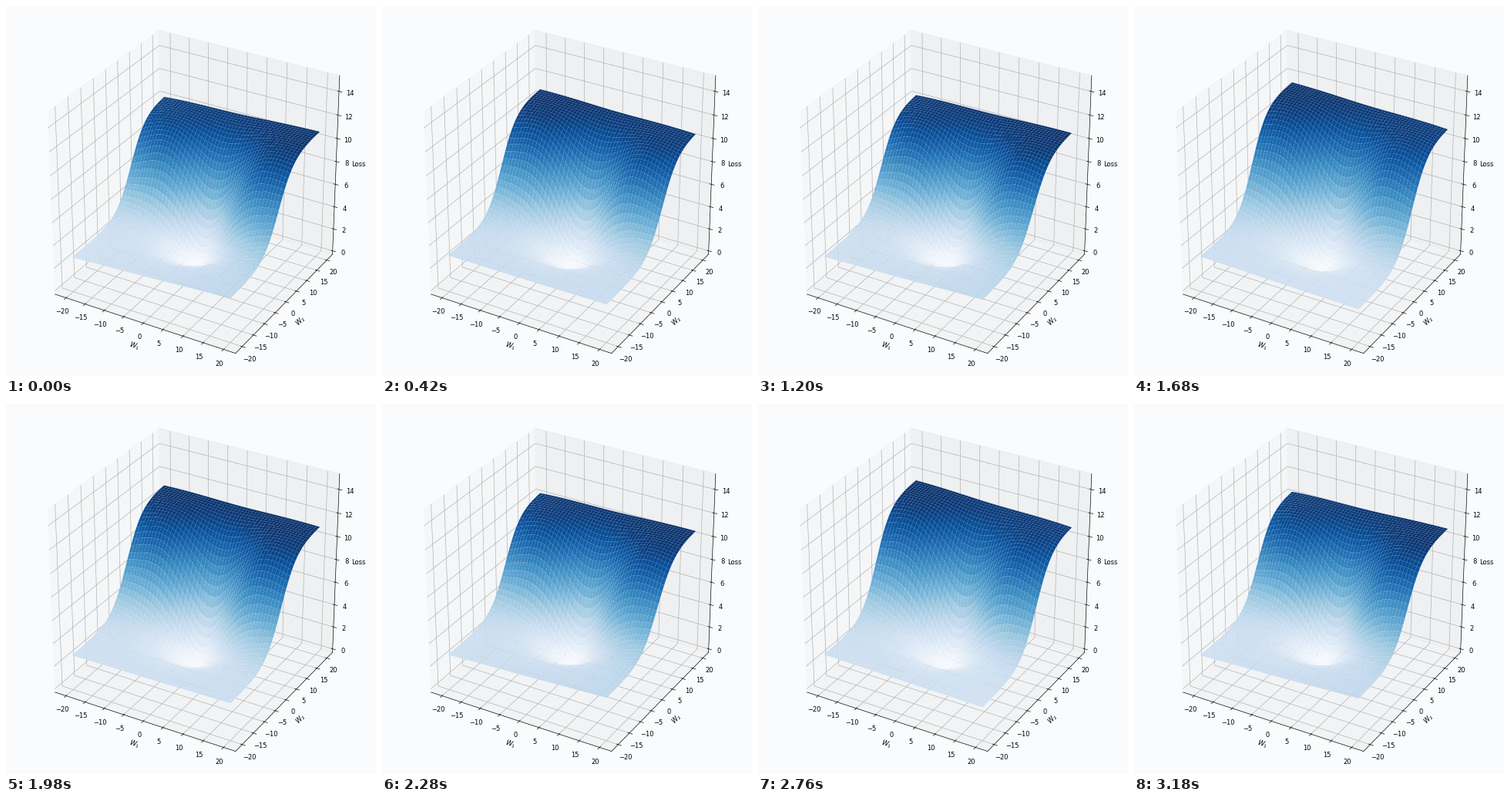
Recreate the animation shown at these times as a matplotlib script. Size 480 by 480 pixels, loop 3240 ms.

```python
import matplotlib.pyplot as plt
import numpy as np
from matplotlib.animation import FuncAnimation

STEPS = 6            # frames between two landscapes
CYCLE = 3 * STEPS
LOOPS = 3
HALF = 20
PAD = 25 / 24        # axes reach slightly past their limits


def landscape(x, y, floor, low, high, bend):
    """A low and a high plain joined by a smooth step, with a dip in the middle.

    low, high and bend are (value at the centre, change towards x = HALF);
    bend is the y at which the step is half way up on the side edges.
    """
    spread = np.hypot(x, 4)
    slope = HALF * y / spread
    middle = bend[0] + bend[1] * x / spread
    step = 1 / (1 + np.exp(-(slope - middle) / 3.2))
    bottom = low[0] + low[1] * x / HALF
    top = high[0] + high[1] * x / HALF
    plain = bottom + (top - bottom) * step
    dip = np.exp(-(x**2 + y**2) / 9**2)
    return plain + (floor - plain) * dip


grid = np.linspace(-HALF, HALF, 50)
X, Y = np.meshgrid(grid, grid)
keys = [
    landscape(X, Y, 0.7, low=(3.15, 0.4), high=(10.53, 0.27), bend=(3.0, -2.0)),
    landscape(X, Y, 0.5, low=(3.05, 0.1), high=(10.6, -0.1), bend=(4.0, 1.0)),
    landscape(X, Y, 0.25, low=(2.55, -0.22), high=(11.6, -0.3), bend=(2.4, 0.6)),
]

fig = plt.figure(figsize=(8, 8), dpi=60, facecolor="#f9fbfd")
ax = fig.add_axes([0, 0, 1, 1], projection="3d")
ax.set_facecolor("none")

surfaces = []
for frame in range(CYCLE):
    k, part = divmod(frame, STEPS)
    mix = part / STEPS
    Z = (1 - mix) * keys[k] + mix * keys[(k + 1) % 3]
    surf = ax.plot_surface(X, Y, Z, cmap="Blues", linewidth=0)
    surf.set_visible(frame == 0)
    surfaces.append(surf)

side = 22 * PAD
ax.set_xlim(-side, side)
ax.set_ylim(-side, side)
ax.set_zlim(7.5 - 7.5 * PAD, 7.5 + 7.5 * PAD)
ax.set_xticks(range(-20, 21, 5))
ax.set_yticks(range(-20, 21, 5))
ax.set_zticks(range(0, 15, 2))
ax.set_box_aspect((1, 1, 1), zoom=np.sqrt(3) / 1.8294640721620434)
ax.view_init(elev=30, azim=-60)
ax.set_xlabel("$W_1$")
ax.set_ylabel("$W_2$")
ax.zaxis.set_rotate_label(False)
ax.set_zlabel("Loss", rotation=0)


def update(i):
    for j, surf in enumerate(surfaces):
        surf.set_visible(j == i % CYCLE)
    return surfaces


anim = FuncAnimation(fig, update, frames=CYCLE * LOOPS, interval=60,
                     repeat=True, repeat_delay=0, blit=False)
plt.show()
```
